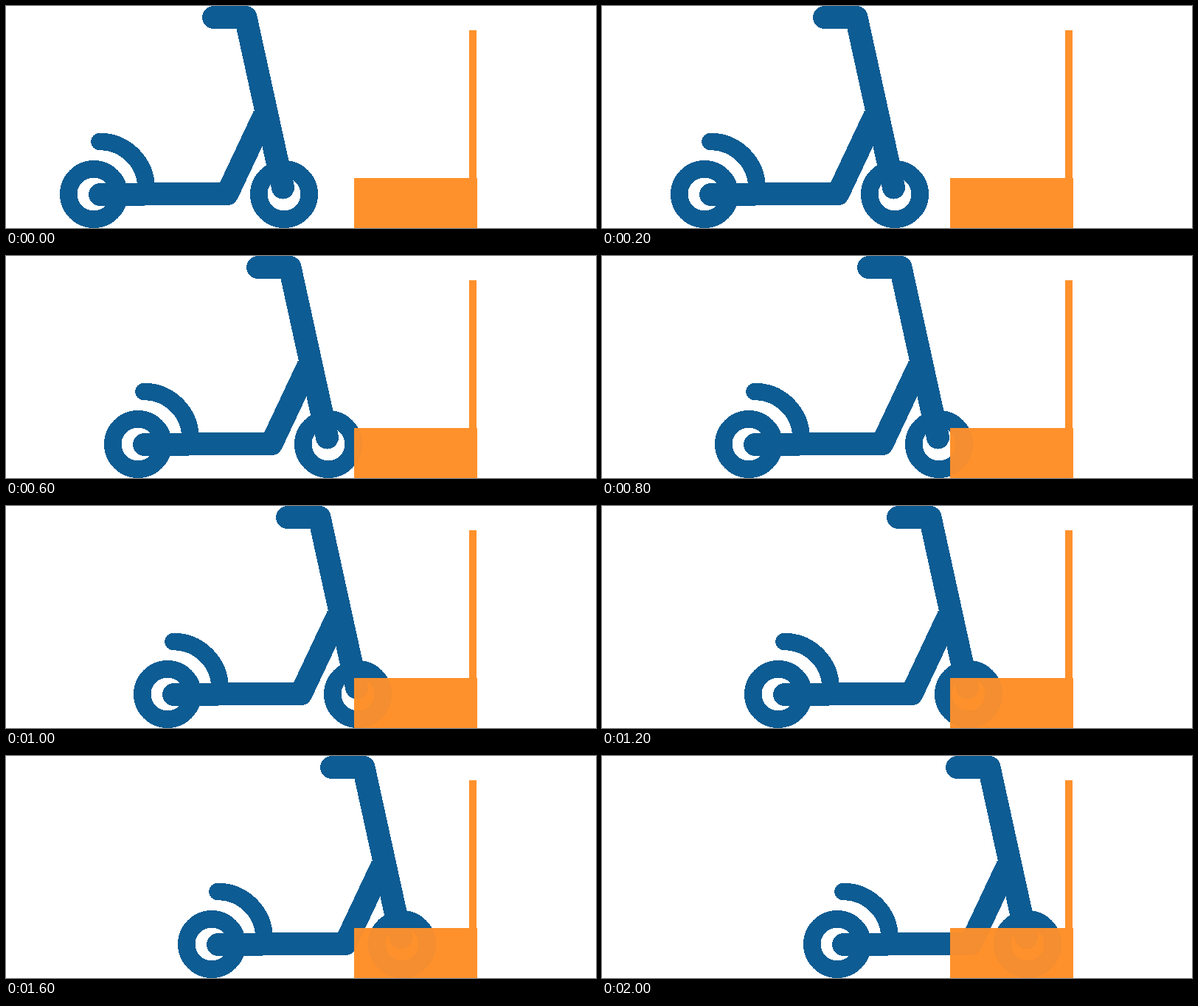
An HTML page that plays this animation: 800x302 px, repeating every 2100 ms.

```html
<!DOCTYPE html>
<html lang="en">
<head>
<meta charset="utf-8">
<title>Scooter</title>
<style>
  html, body { margin: 0; width: 100%; height: 100%; overflow: hidden; background: #fff; }
  svg { display: block; shape-rendering: crispEdges; }
  #scooter { fill: none; stroke: #0d5c93; stroke-width: 31; stroke-linecap: round; stroke-linejoin: round; }
</style>
</head>
<body>
<svg width="800" height="302" viewBox="0 0 800 302">
  <g id="scooter">
    <g stroke-width="23.5">
      <circle cx="119" cy="256" r="34.25"/>
      <circle cx="377" cy="256" r="34.25"/>
      <path d="M127 184.5A63 63 0 0 1 190 247.5"/>
    </g>
    <path d="M127.5 256.5H172.5"/>
    <path d="M172 256.5H188" stroke-linecap="butt"/>
    <path d="M188 255.5H300L350 149" stroke-linecap="butt"/>
    <path d="M281.5 15.5H325L375.5 247"/>
  </g>
  <path d="M628 33h10v201h1v68H472V234H628z" fill="#ff912c"/>
  <!-- faint trace of the scooter showing through the box -->
  <use href="#scooter" opacity=".04"/>
</svg>
<script>
  const STEP_MS = 100, STEPS = 21, STEP_PX = 10;
  const scooter = document.getElementById('scooter');
  const start = performance.now();

  function draw() {
    const step = Math.floor((performance.now() - start) / STEP_MS) % STEPS;
    scooter.setAttribute('transform', `translate(${step * STEP_PX})`);
    requestAnimationFrame(draw);
  }
  draw();
</script>
</body>
</html>
```
